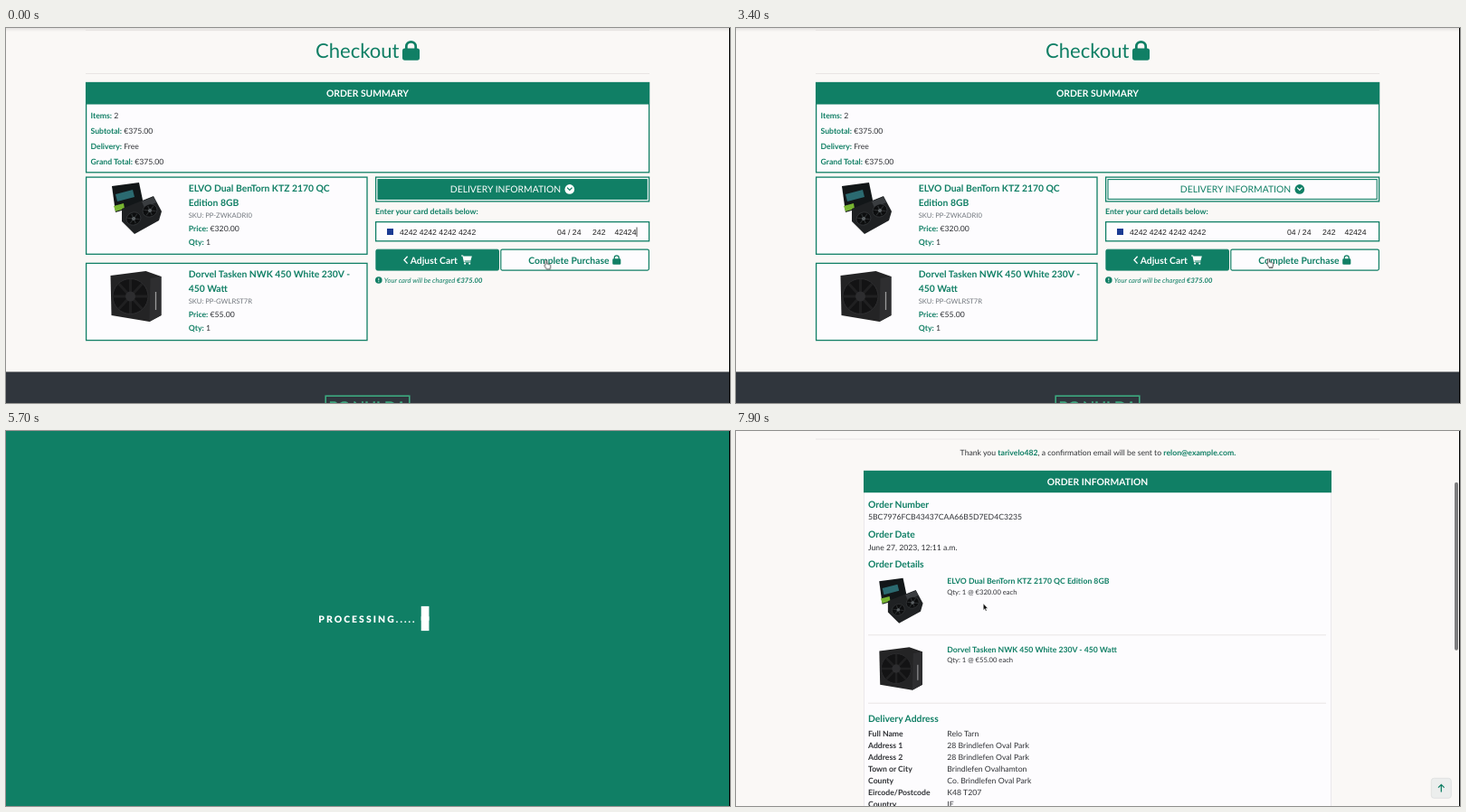
An HTML page that plays this animation: 800x415 px, repeating every 8000 ms.

```html
<!DOCTYPE html>
<html lang="en">
<head>
<meta charset="utf-8">
<title>Checkout</title>
<style>
@property --s { syntax: '<number>'; inherits: true; initial-value: 0; }
html, body { margin: 0; width: 100%; height: 100%; overflow: hidden; background: #faf8f6; }
svg { display: block; width: 800px; height: 415px; --green: #107f65; color: var(--green); }
text { font: 8.66px Lato, sans-serif; fill: #303236; text-rendering: geometricPrecision; }
.b { font-weight: 700; }
.i { font-style: italic; }
.h1 { font-size: 22.05px; }
.h2 { font-size: 10.35px; }
.sm { font-size: 7.62px; }
.promo { font-size: 11.2px; }
.busy { font-size: 10.4px; font-weight: 900; letter-spacing: .2em; }
.g { fill: var(--green); }
.w { fill: #fff; }
.cc { fill: currentColor; }
.mid { text-anchor: middle; }
.grey { fill: #70767c; }
.brand { font-size: 17.4px; fill: currentColor; stroke: currentColor; stroke-width: .45; }
.card text { font-family: "Liberation Sans", Arial, sans-serif; fill: #222; }
.box { fill: #fdfcfe; stroke: var(--green); stroke-width: 1.3; }
.hr { stroke: #e5e1e0; stroke-width: .8; }
.line { fill: none; stroke: currentColor; }

.delivery, .purchase, .caret, .hand, .overlay, .order, .toast, .thumb, .up, .arrow {
  animation: 8s linear infinite both paused;
}
.delivery { animation-name: delivery; }
.purchase { animation-name: purchase; }
.caret { animation-name: caret; animation-timing-function: step-end; }
.hand { animation-name: hand; animation-timing-function: ease-in-out; }
.overlay { animation-name: overlay; }
.order { animation-name: order, scroll; animation-timing-function: step-end, linear; }
.toast { animation-name: toast; filter: drop-shadow(0 15px 20px rgba(0, 0, 0, .6)); }
.thumb { animation-name: thumb; animation-timing-function: step-end; }
.up { animation-name: up; }
.arrow { animation-name: arrow; animation-timing-function: step-end; }
.bar { fill: #fff; y: 193.9px; animation: load .7s 3648ms ease-in-out infinite alternate both paused; }
.page { transform: translateY(calc(var(--s) * -1px)); }
.track { transform: translateY(calc(var(--s) * .44px)); }

@keyframes delivery { 0%, 6.5% { fill: #107f65; color: #fff } 8.5%, 100% { fill: #fdfcfe; color: #107f65 } }
@keyframes purchase {
  0%, 3% { fill: #fdfcfe; color: #107f65 }
  4.5%, 26.5% { fill: #107f65; color: #fff }
  30%, 100% { fill: #fdfcfe; color: #107f65 }
}
@keyframes caret { 0% { opacity: 1 } 9%, 100% { opacity: 0 } }
@keyframes hand {
  0%, 1% { transform: translate(594.3px, 256.5px) }
  8%, 20% { transform: translate(594.5px, 177.5px) }
  21.3% { transform: translate(594.7px, 177.5px) }
  27.5%, 41.3% { transform: translate(587px, 254.5px) }
  42.5%, 100% { transform: translate(586px, 254.5px) }
}
@keyframes overlay { 0%, 45% { opacity: 0 } 46.9%, 100% { opacity: 1 } }
@keyframes load {
  0% { x: 332px; width: 8.2px; height: 16.3px }
  50% { width: 21.8px; height: 4.4px }
  100% { x: 459.9px; width: 8.2px; height: 16.3px }
}
@keyframes order { 0% { visibility: hidden } 73.7%, 100% { visibility: visible } }
@keyframes scroll {
  0%, 82.5% { --s: 0 }
  83.75% { --s: 3 }
  85% { --s: 14 }
  87.5% { --s: 48.3 }
  90% { --s: 79 }
  92.5% { --s: 101 }
  95% { --s: 115 }
  98.7%, 100% { --s: 125.2 }
}
@keyframes toast { 0%, 75% { opacity: 0 } 77.4%, 83.7% { opacity: 1 } 83.74%, 100% { opacity: 0 } }
@keyframes thumb { 0% { opacity: 0 } 83.7%, 100% { opacity: 1 } }
@keyframes up { 0%, 91.5% { opacity: 0 } 93%, 100% { opacity: 1 } }
@keyframes arrow { 0% { opacity: 0 } 95%, 100% { opacity: 1 } }
</style>
</head>
<body>
<svg viewBox="0 0 800 415" width="800" height="415">
  <defs>
    <linearGradient id="shade" x2="0" y2="1">
      <stop stop-color="#000" stop-opacity=".09"/>
      <stop offset="1" stop-color="#000" stop-opacity="0"/>
    </linearGradient>
    <g id="lock" class="cc">
      <rect y="6.2" width="14" height="9.8" rx="2"/>
      <path class="line" stroke-width="2" d="M3.2 7V4.6a3.8 3.6 0 0 1 7.6 0V7"/>
    </g>
    <g id="cart" class="cc">
      <path d="M0 0h2.8l.5 1.4H16L14 8H5l.3 1.3H14v1.3H4L2 1.3H0z"/>
      <circle cx="5.5" cy="12.6" r="1.4"/><circle cx="12.5" cy="12.6" r="1.4"/>
    </g>
    <g id="fan">
      <circle r="8.5" fill="#0c0d0e" stroke="#3c3f42" stroke-width=".7"/>
      <path d="M-6-4 6 4M-6 4 6-4M0-7V7" stroke="#2a2d2f" stroke-width="1.4"/>
      <circle r="2.2" fill="#5b6063"/>
    </g>
    <g id="gpu">
      <path d="M1 5 31 1l5 24L5 34z" fill="#121618"/>
      <path d="M5 14 24 9l2 8-19 5z" fill="#2b6a70"/>
      <path d="M3 27 14 24l1 6-10 3z" fill="#78b532"/>
      <path d="M12 30 47 16l9 17-3 10-27 15-14-14z" fill="#1f2123"/>
      <path d="M34 22 47 17l3 6-13 6z" fill="#3a3d40"/>
      <use href="#fan" transform="translate(25 41) rotate(-24) scale(.95 .82)"/>
      <use href="#fan" transform="translate(43 32) rotate(-24) scale(.95 .82)"/>
    </g>
    <g id="psu">
      <path d="M1 6 40 1l17 6v43l-13 7L2 50z" fill="#242425"/>
      <path d="M45 9l12-2v43l-13 7z" fill="#2e2e30"/>
      <circle cx="23" cy="29" r="19.5" fill="#131314" stroke="#2e2e30"/>
      <path d="M23 10v38M4 29h38M10 15l26 28M36 15 10 43" stroke="#202021" stroke-width="3"/>
      <circle cx="23" cy="29" r="5.5" fill="#2d2d2f"/>
      <path d="M51 24v20" stroke="#9b9b9c" stroke-width="1.3"/>
    </g>
  </defs>

  <!-- checkout page -->
  <rect width="800" height="415" fill="#faf8f6"/>
  <rect width="800" height="4" fill="url(#shade)"/>
  <path class="hr" d="M88 2.5H711M88 50.5H711"/>
  <text class="h1 g" x="342" y="33">Checkout</text>
  <use href="#lock" transform="translate(438 14) scale(1.36)"/>

  <rect class="box" x="88.6" y="60.5" width="622" height="99.3"/>
  <rect class="g" x="88" y="60" width="623" height="24.5"/>
  <text class="h2 b w mid" x="399.5" y="75.7">ORDER SUMMARY</text>
  <text x="93.5" y="99.6"><tspan class="b g">Items:</tspan> 2</text>
  <text x="93.5" y="116.8"><tspan class="b g">Subtotal:</tspan> €375.00</text>
  <text x="93.5" y="134.1"><tspan class="b g">Delivery:</tspan> Free</text>
  <text x="93.5" y="151.4"><tspan class="b g">Grand Total:</tspan> €375.00</text>

  <rect class="box" x="88.6" y="165.1" width="310.4" height="85.2"/>
  <use href="#gpu" x="116" y="170"/>
  <text class="h2 b g" x="201.7" y="181.3">ELVO Dual BenTorn KTZ 2170 QC<tspan x="201.7" dy="15.9">Edition 8GB</tspan></text>
  <text class="sm grey" x="201.7" y="210">SKU: PP-ZWKADRI0</text>
  <text x="201.7" y="224.7"><tspan class="b g">Price:</tspan> €320.00</text>
  <text x="201.7" y="239.9"><tspan class="b g">Qty:</tspan> 1</text>

  <rect class="box" x="88.6" y="260.4" width="310.4" height="85.2"/>
  <use href="#psu" x="114.5" y="268"/>
  <text class="h2 b g" x="201.7" y="276.4">Dorvel Tasken NWK 450 White 230V -<tspan x="201.7" dy="15.9">450 Watt</tspan></text>
  <text class="sm grey" x="201.7" y="305.1">SKU: PP-GWLRST7R</text>
  <text x="201.7" y="319.8"><tspan class="b g">Price:</tspan> €55.00</text>
  <text x="201.7" y="335"><tspan class="b g">Qty:</tspan> 1</text>

  <rect class="box" x="408.6" y="165.1" width="302" height="26.8"/>
  <g class="delivery">
    <rect x="411" y="167.6" width="297.2" height="21.8" stroke="#107f65" stroke-width="1.1"/>
    <text class="h2 cc" x="490.8" y="182.2">DELIVERY INFORMATION</text>
    <circle class="cc" cx="622.8" cy="178.4" r="5.3"/>
    <path d="M619.6 177.1l.9-.9 2.3 2.3 2.3-2.3.9.9-3.2 3.2z"/>
  </g>

  <text class="b g" x="408" y="206.2">Enter your card details below:</text>
  <rect class="box" x="408.6" y="214.6" width="302" height="21.2"/>
  <rect x="421" y="222" width="7" height="7" fill="#1b3b93"/>
  <g class="card">
    <text x="435" y="228.8">4242 4242 4242 4242</text>
    <text x="609" y="228.8">04 / 24</text>
    <text x="648" y="228.8">242</text>
    <text x="672.4" y="228.8">42424</text>
  </g>
  <path class="caret" d="M697 220.5v10.5" stroke="#222" stroke-width=".8"/>

  <g style="fill:var(--green);color:#fff">
    <rect x="408.9" y="245.2" width="135.6" height="22.9" rx="1.5" stroke="#107f65"/>
    <path class="line" stroke-width="1.4" d="M443.6 252.8l-3.6 3.9 3.6 3.9"/>
    <text class="h2 b cc" x="446.8" y="260.5">Adjust Cart</text>
    <use href="#cart" transform="translate(503 251.5) scale(.74)"/>
  </g>
  <g class="purchase">
    <rect x="546.8" y="245.2" width="163.6" height="22.9" rx="1.5" stroke="#107f65" stroke-width="1.2"/>
    <text class="h2 b cc" x="577.3" y="260.5">Complete Purchase</text>
    <use href="#lock" transform="translate(670.2 251.3) scale(.65)"/>
  </g>
  <circle class="g" cx="411.8" cy="279" r="3.8"/>
  <path d="M411.8 276.8v2.6M411.8 280.2v1" stroke="#fff" stroke-width=".9"/>
  <text class="sm g i" x="417.8" y="281.7">Your card will be charged <tspan class="b">€375.00</tspan></text>

  <rect y="380.5" width="800" height="35" fill="#30363d"/>
  <g style="color:#3da97f">
    <rect class="line" x="353.2" y="407.2" width="92.6" height="25" stroke-width="1.6"/>
    <text class="brand mid" x="399.5" y="425.8">PC NULDA</text>
  </g>
  <path class="hand" fill="#fff" stroke="#111" stroke-width=".7" stroke-linejoin="round"
    d="M2.5.5c.6 0 1 .4 1 1v3l3 .6c.8.2 1.2.7 1.1 1.4L7 10.4H3L.7 6.8c-.4-.8.4-1.3 1-.8V1.5c0-.6.3-1 .8-1z"/>

  <!-- processing screen -->
  <g class="overlay">
    <rect width="800" height="415" class="g"/>
    <text class="w busy" x="345.2" y="211.5">PROCESSING.....</text>
    <rect class="bar"/>
    <g transform="matrix(1 0 0 -1 0 415)"><rect class="bar"/></g>
  </g>

  <!-- order complete page -->
  <g class="order">
    <rect width="800" height="415" fill="#faf8f6"/>
    <g class="page">
      <rect class="g" width="800" height="24.5"/>
      <g class="w">
        <path d="M312 7.5h7.5v2h2.8l2.4 2.7v3.6H312z"/>
        <circle cx="315" cy="16" r="1.7" stroke="#107f65" stroke-width=".6"/>
        <circle cx="321.6" cy="16" r="1.7" stroke="#107f65" stroke-width=".6"/>
        <text class="promo b i w" x="327" y="16.2">Free delivery on orders over €100!</text>
      </g>
      <rect y="77" width="800" height="9" fill="url(#shade)"/>
      <rect class="line" x="13.6" y="38" width="92.8" height="24.6" stroke-width="1.7"/>
      <text class="brand mid" x="60" y="56.6">PC NULDA</text>
      <text class="b" x="254.6" y="56">Home</text>
      <text class="b" x="295.4" y="56">All Products</text>
      <text class="b" x="360.6" y="56">About Us</text>
      <text class="b" x="414" y="56">Blog</text>
      <text class="b" x="449" y="56">Contact Us</text>
      <g style="color:#303236">
        <path class="line" stroke-width="1.5" d="M663.2 45.6l3.2 3.4"/>
        <circle class="line" stroke-width="1.5" cx="660.4" cy="43" r="3.5"/>
        <circle class="cc" cx="719" cy="41.4" r="2.6"/>
        <path class="cc" d="M714.2 49.2c0-5.6 9.6-5.6 9.6 0z"/>
        <use href="#cart" transform="translate(770 40) scale(.59)"/>
        <text class="mid" x="661.3" y="60.5">Search</text>
        <text class="mid" x="719" y="60.5">My Account</text>
        <text class="mid" x="774.8" y="60.5">€0.00</text>
      </g>

      <path class="hr" d="M88 86H711M88 134.2H711"/>
      <text class="h1 g" x="308.2" y="116">Order Complete</text>
      <circle class="g" cx="479.6" cy="107.8" r="10.9"/>
      <path d="M474.8 108l3.4 3.4 6.2-6.4" fill="none" stroke="#fff" stroke-width="2.2"/>
      <text x="247.6" y="152.6">Thank you <tspan class="b g">tarivelo482</tspan>, a confirmation email will be sent to <tspan class="b g">relon@example.com.</tspan></text>

      <rect x="141.4" y="169.5" width="516" height="500" fill="#fdfcfe" stroke="#e6e4e8" stroke-width=".8"/>
      <rect class="g" x="141" y="169" width="517" height="24.4"/>
      <text class="h2 b w mid" x="399.5" y="185.1">ORDER INFORMATION</text>
      <text class="h2 b g" x="146" y="209.9">Order Number</text>
      <text x="146" y="223.7">5BC7976FCB43437CAA66B5D7ED4C3235</text>
      <text class="h2 b g" x="146" y="243">Order Date</text>
      <text x="146" y="256.8">June 27, 2023, 12:11 a.m.</text>
      <text class="h2 b g" x="146" y="276">Order Details</text>

      <use href="#gpu" transform="translate(157.3 287) scale(.88)"/>
      <text class="b g" x="233.3" y="294.2">ELVO Dual BenTorn KTZ 2170 QC Edition 8GB</text>
      <text class="sm" x="233.3" y="306.1">Qty: 1 @ €320.00 each</text>
      <path class="hr" d="M146 351H652M146 426.4H652"/>
      <use href="#psu" transform="translate(157.5 363.5) scale(.85)"/>
      <text class="b g" x="233.3" y="369.8">Dorvel Tasken NWK 450 White 230V - 450 Watt</text>
      <text class="sm" x="233.3" y="381.6">Qty: 1 @ €55.00 each</text>

      <text class="h2 b g" x="146" y="447">Delivery Address</text>
      <g id="address"></g>
    </g>

    <g class="toast">
      <path class="g" d="M764.5 77l4.5-5 4.5 5z"/>
      <rect x="601" y="77" width="189" height="91" fill="#fdfcfe"/>
      <rect class="g" x="601" y="77" width="189" height="20.5"/>
      <text class="sm b w" x="607.6" y="90.2">SUCCESS!</text>
      <path d="M777.3 84.3l5 5m0-5l-5 5" stroke="#a5cfc4" stroke-width="1.4"/>
      <text class="sm" y="112.9">
        <tspan x="607.6">Thank You tarivelo482! Order successfully</tspan>
        <tspan x="607.6" dy="11.5">processed! Your order number is</tspan>
        <tspan x="607.6" dy="11.5">5BC7976FCB43437CAA66B5D7ED4C3235. A</tspan>
        <tspan x="607.6" dy="11.5">confirmation email will be sent to</tspan>
        <tspan x="607.6" dy="11.5">relon@example.com.</tspan>
      </text>
    </g>

    <g class="up">
      <rect x="768.3" y="384.3" width="22" height="22" rx="3" fill="#eceeed" stroke="#dcdedd" stroke-width=".8"/>
      <path class="line" stroke-width="1.3" d="M779.3 399.5v-8M776 394.6l3.3-3.3 3.3 3.3"/>
    </g>
    <g class="thumb"><rect class="track" x="794" y="1.7" width="4" height="186" rx="2" fill="#7d7d7e"/></g>
    <path class="arrow" d="M273.3 191v7.2l1.6-1.5 1.1 2.5 1.1-.5-1.1-2.4h2.2z" fill="#111" stroke="#fff" stroke-width=".4"/>
  </g>
  <rect x="799" width="1" height="415"/>
</svg>
<script>
const rows = [
  ['Full Name', 'Relo Tarn'],
  ['Address 1', '28 Brindlefen Oval Park'],
  ['Address 2', '28 Brindlefen Oval Park'],
  ['Town or City', 'Brindlefen Ovalhamton'],
  ['County', 'Co. Brindlefen Oval Park'],
  ['Eircode/Postcode', 'K48 T207'],
  ['Country', 'IE']
];
document.getElementById('address').innerHTML = rows.map(([label, value], i) => {
  const y = 463.3 + 13 * i;
  return `<text class="b" x="146" y="${y}">${label}</text><text x="233.3" y="${y}">${value}</text>`;
}).join('');

// One clock drives every paused CSS animation in 100 ms steps.
const LOOP = 8000, STEP = 100;
const anims = document.getAnimations();
const start = performance.now();
function tick() {
  const t = (performance.now() - start) % LOOP;
  const held = t - t % STEP;
  for (const a of anims) a.currentTime = held;
  requestAnimationFrame(tick);
}
tick();
</script>
</body>
</html>
```
